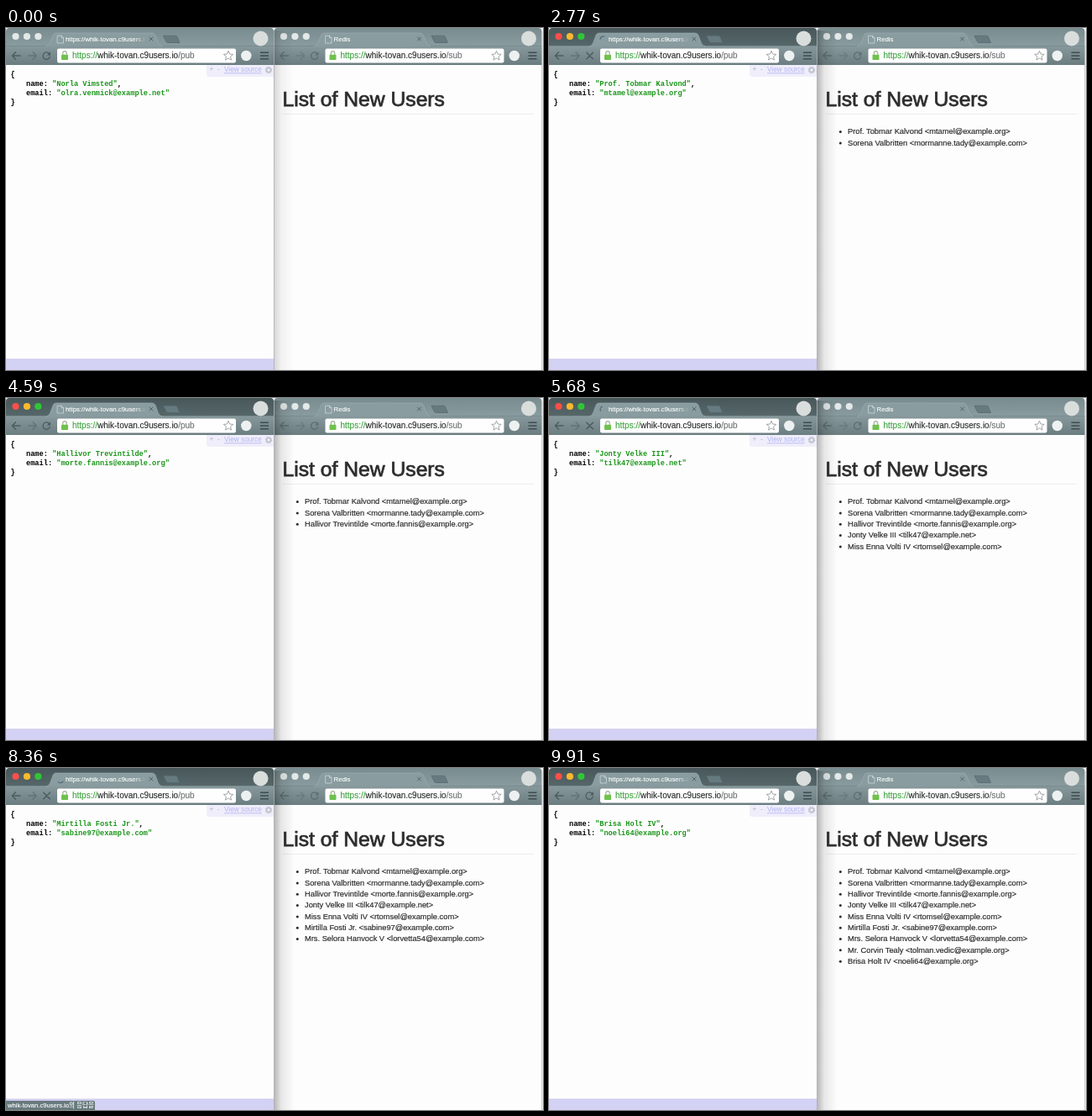
Animation, 640 px wide and 407 px high, one loop 9990 ms. Source, as an HTML page:

```html
<!DOCTYPE html>
<html lang="en">
<head>
<meta charset="utf-8">
<title>Publish and subscribe</title>
<style>
  html, body { margin: 0; width: 100%; height: 100%; overflow: hidden; background: #fff; }
  svg { display: block; width: 640px; height: 407px; }
  text { font-family: "Liberation Sans", Arial, sans-serif; white-space: pre; }
  .json { font: bold 8.64px "Liberation Mono", "Courier New", monospace; fill: #000; }
  .json .value { fill: #199619; }
  .url { font-size: 10px; fill: #262828; stroke: #262828; stroke-width: .12px; }
  .url .scheme { fill: #3aa03c; stroke: #3aa03c; }
  .url .path { fill: #6c7070; stroke: #6c7070; }
  .tab { font-size: 7.8px; fill: #fbfdfd; stroke: #fbfdfd; stroke-width: .15px; }
  .item { font-size: 9.3px; fill: #2b2b2b; stroke: #2b2b2b; stroke-width: .18px; }
  .line { fill: none; stroke-linecap: round; stroke-linejoin: round; }
</style>
</head>
<body>
<svg id="stage" viewBox="0 0 640 407" xmlns="http://www.w3.org/2000/svg"></svg>
<script>
const LOOP = 9990;
const ACTIVATE = 800;
const LOAD_LEAD = 120, LOAD_TAIL = 120;
const HOST = 'whik-tovan.c9users.io';

// [time of arrival, name, email]
const users = [
  [1560, 'Prof. Tobmar Kalvond', 'mtamel@example.org'],
  [2750, 'Sorena Valbritten', 'mormanne.tady@example.com'],
  [3760, 'Hallivor Trevintilde', 'morte.fannis@example.org'],
  [4750, 'Jonty Velke III', 'tilk47@example.net'],
  [5640, 'Miss Enna Volti IV', 'rtomsel@example.com'],
  [6450, 'Mirtilla Fosti Jr.', 'sabine97@example.com'],
  [8270, 'Mrs. Selora Hanvock V', 'lorvetta54@example.com'],
  [8860, 'Mr. Corvin Tealy', 'tolman.vedic@example.org'],
  [9400, 'Brisa Holt IV', 'noeli64@example.org']
];
const firstUser = [0, 'Norla Vimsted', 'olra.venmick@example.net'];

const gradient = (id, top, bottom) =>
  `<linearGradient id="${id}" x2="0" y2="1"><stop stop-color="${top}"/><stop offset="1" stop-color="${bottom}"/></linearGradient>`;

const lights = colors => colors.map((c, i) =>
  `<circle cx="${11.5 + i * 13.4}" cy="10" r="4.1" fill="${c}"/>`).join('');

const docIcon = '<path class="line" d="M61.5 9.2h4.5l2.5 2.5v6.3h-7zM66 9.2v2.5h2.5" stroke="#d5dfe0" stroke-width=".7"/>';

const reloadIcon = '<path class="line" d="M51.6 30.6a4.2 4.2 0 1 0 .7 3.6" stroke-width="1.3"/><path d="M53 28.2v4.2h-4.2z" stroke="none"/>';

function starPath(cx, cy, r) {
  let d = '';
  for (let i = 0; i < 10; i++) {
    const a = i * Math.PI / 5 - Math.PI / 2, k = i % 2 ? r * .45 : r;
    d += (i ? 'L' : 'M') + (cx + k * Math.cos(a)).toFixed(2) + ' ' + (cy + k * Math.sin(a)).toFixed(2);
  }
  return d + 'Z';
}

function browser(id, x, title, path, ink) {
  return `<g transform="translate(${x})">
    <path id="${id}Bar" d="M0 23V4Q0 0 4 0H315Q319 0 319 4V23Z" fill="url(#idle)"/>
    <rect y="21" width="319.5" height="23" fill="url(#tools)"/>
    <path d="M0 21.4H49M186 21.4H319" stroke="#55676a" stroke-opacity=".4" stroke-width=".7"/>
    <path d="M48 22Q51 21 52.5 18L56 8.5Q57 6 59.5 6H174Q177 6 178 8.5L181.5 18Q183 21 186 22Z" fill="#899c9f" stroke="#9fb0b3" stroke-width=".6"/>
    <rect x="49" y="21" width="136" height="2" fill="#87999c"/>
    <path d="M187.5 9.2H202Q203.5 9.2 204 10.5L207 17.5H193Q191.5 17.5 191 16.2Z" fill="#667b80" stroke="#53666a" stroke-width=".7"/>
    <g id="${id}Lights">${lights(['#e3e8e8', '#e3e8e8', '#e3e8e8'])}</g>
    <g id="${id}Doc">${docIcon}</g>
    <text class="tab" x="71" y="15.8" mask="url(#fade)">${title}</text>
    <path class="line" d="M171 11l4 4M175 11l-4 4" stroke="#4f6062" stroke-width=".9"/>
    <circle cx="303.5" cy="12.5" r="9" fill="#d9dddc"/>
    <g class="line" stroke="${ink}" stroke-width="1.4">
      <path d="M17 33H7.5M11.5 28.8L7.3 33l4.2 4.2"/>
      <path d="M26.5 33H36M32 28.8l4.2 4.2-4.2 4.2" opacity=".5"/>
    </g>
    <g id="${id}Reload" stroke="${ink}" fill="${ink}">${reloadIcon}</g>
    <rect x="61" y="24.5" width="213" height="17" rx="2" fill="#fefefe"/>
    <path class="line" d="M67.8 32v-2.2a2.2 2.2 0 0 1 4.4 0V32" stroke="#a0b398" stroke-width="1.2"/>
    <rect x="66" y="31.7" width="8" height="6.3" rx=".8" fill="#6fc14d"/>
    <text class="url" x="79" y="36.4"><tspan class="scheme">https://</tspan>${HOST}<tspan class="path">/${path}</tspan></text>
    <path d="${starPath(265, 33.2, 6)}" fill="#fff" stroke="#8c9192" stroke-width=".8" stroke-linejoin="round"/>
    <circle cx="286.3" cy="33" r="6.2" fill="#eef1f1"/>
    <path d="M303 29.3h10M303 33h10M303 36.7h10" stroke="#3d4c4f" stroke-width="1.5"/>
  </g>`;
}

const $ = id => document.getElementById(id);

$('stage').innerHTML = `
  <defs>
    ${gradient('idle', '#788b8e', '#8b9da0')}
    ${gradient('active', '#48575a', '#57686b')}
    ${gradient('tools', '#87999c', '#6b7d80')}
    <linearGradient id="fadeRamp" gradientUnits="userSpaceOnUse" x1="153" x2="167">
      <stop stop-color="#fff"/><stop offset="1" stop-color="#000"/>
    </linearGradient>
    <mask id="fade" maskUnits="userSpaceOnUse" x="60" y="0" width="107" height="24">
      <rect x="60" width="107" height="24" fill="url(#fadeRamp)"/>
    </mask>
    <linearGradient id="shadow">
      <stop stop-opacity=".28"/><stop offset=".35" stop-opacity=".09"/><stop offset="1" stop-opacity="0"/>
    </linearGradient>
  </defs>
  <rect width="640" height="407" fill="#fefdfe"/>
  ${browser('sub', 319.5, 'Redis', 'sub', '#5b6e72')}
  <path d="M638.8 4V407" stroke="#b9bebe" stroke-width="1"/>
  <text x="329.5" y="92.9" font-size="24.7" fill="#2d2d2d" stroke="#2d2d2d" stroke-width=".75">List of New Users</text>
  <path d="M330 102.5H629" stroke="#ebebeb" stroke-width=".9"/>
  ${users.map(([, name, email], i) => `<g class="row" transform="translate(0 ${(i * 13.32).toFixed(2)})">
    <circle cx="347.3" cy="123.6" r="1.5" fill="#2b2b2b"/>
    <text class="item" x="356" y="126.4">${name} &lt;${email}&gt;</text></g>`).join('')}
  <rect id="cast" x="319.5" y="3" width="24" height="404" fill="url(#shadow)"/>
  <rect y="43" width="319.5" height="364" fill="#fefdfe"/>
  ${browser('pub', 0, 'https://' + HOST, 'pub', '#4c5d61')}
  <path class="line" id="spinner" d="M65 9.8a3.9 3.9 0 0 1 3.9 3.9" stroke="#50697a" stroke-width="1.3"/>
  <g>
    <text class="json" x="5.5" y="58">{</text>
    <text class="json" x="24" y="69">name: <tspan class="value" id="name"></tspan>,</text>
    <text class="json" x="24" y="80">email: <tspan class="value" id="email"></tspan></text>
    <text class="json" x="5.5" y="91">}</text>
  </g>
  <g id="panel">
    <path d="M239 44H319.5V58H242Q239 58 239 55Z" fill="#d2d0f3"/>
    <text x="242.5" y="52.4" font-size="8.3" fill="#23233f">+</text>
    <text x="252" y="52.4" font-size="8.3" fill="#23233f">-</text>
    <text x="260" y="52.4" font-size="8.26" fill="#1c1cdf" text-decoration="underline">View source</text>
    <circle cx="313" cy="50" r="2.5" fill="none" stroke="#3f4b66" stroke-width="1.7"/>
    <circle cx="313" cy="50" r="3.7" fill="none" stroke="#3f4b66" stroke-width="1.2" stroke-dasharray="1.5 1.406"/>
  </g>
  <rect y="394" width="319.5" height="13" fill="#d3d1f4"/>
  <path d="M0 394H319.5" stroke="#c4c2e2" stroke-width=".7"/>
  <g id="status">
    <path d="M0 396H104Q106 396 106 398V407H0Z" fill="#687a7e"/>
    <text x="2" y="404.3" font-size="7.6" fill="#fff" stroke="#fff" stroke-width=".15" style="font-family:'Liberation Sans','Noto Sans CJK KR','Noto Sans CJK',sans-serif">${HOST}의 응답을</text>
  </g>
  <path d="M319.5 3V407" stroke="#a4a9aa" stroke-width=".8"/>`;

const rows = [...document.querySelectorAll('.row')];
const show = (el, on) => { el.style.display = on ? '' : 'none'; };
const stopIcon = '<path class="line" d="M44.8 29.2l7.6 7.6M52.4 29.2l-7.6 7.6" stroke-width="1.5"/>';

function draw(t) {
  const active = t >= ACTIVATE;
  const loading = users.some(([at]) => t >= at - LOAD_LEAD && t < at + LOAD_TAIL);
  const done = users.filter(([at]) => t >= at + LOAD_TAIL);
  const user = done.length ? done[done.length - 1] : firstUser;
  const age = done.length ? t - user[0] - LOAD_TAIL : LOOP;

  $('pubBar').setAttribute('fill', active ? 'url(#active)' : 'url(#idle)');
  $('pubLights').innerHTML = lights(active ? ['#fa4f4b', '#fdb92d', '#30c638'] : ['#e3e8e8', '#e3e8e8', '#e3e8e8']);
  $('pubReload').innerHTML = loading ? stopIcon : reloadIcon;
  $('cast').style.opacity = active ? 1 : .55;

  show($('pubDoc'), !loading);
  show($('spinner'), loading);
  $('spinner').setAttribute('transform', `rotate(${(t * .36) % 360} 65 13.7)`);
  show($('status'), users.some(([at]) => t >= at + 60 && t < at + LOAD_TAIL + 130));

  $('name').textContent = `"${user[1]}"`;
  $('email').textContent = `"${user[2]}"`;
  const fade = Math.min(1, Math.max(0, (age - 150) / 200));
  $('panel').style.opacity = loading ? .32 : 1 - .68 * fade;
  rows.forEach((row, i) => show(row, t >= users[i][0]));
}

const start = performance.now();
function tick() {
  draw((performance.now() - start) % LOOP);
  requestAnimationFrame(tick);
}
tick();
</script>
</body>
</html>
```
